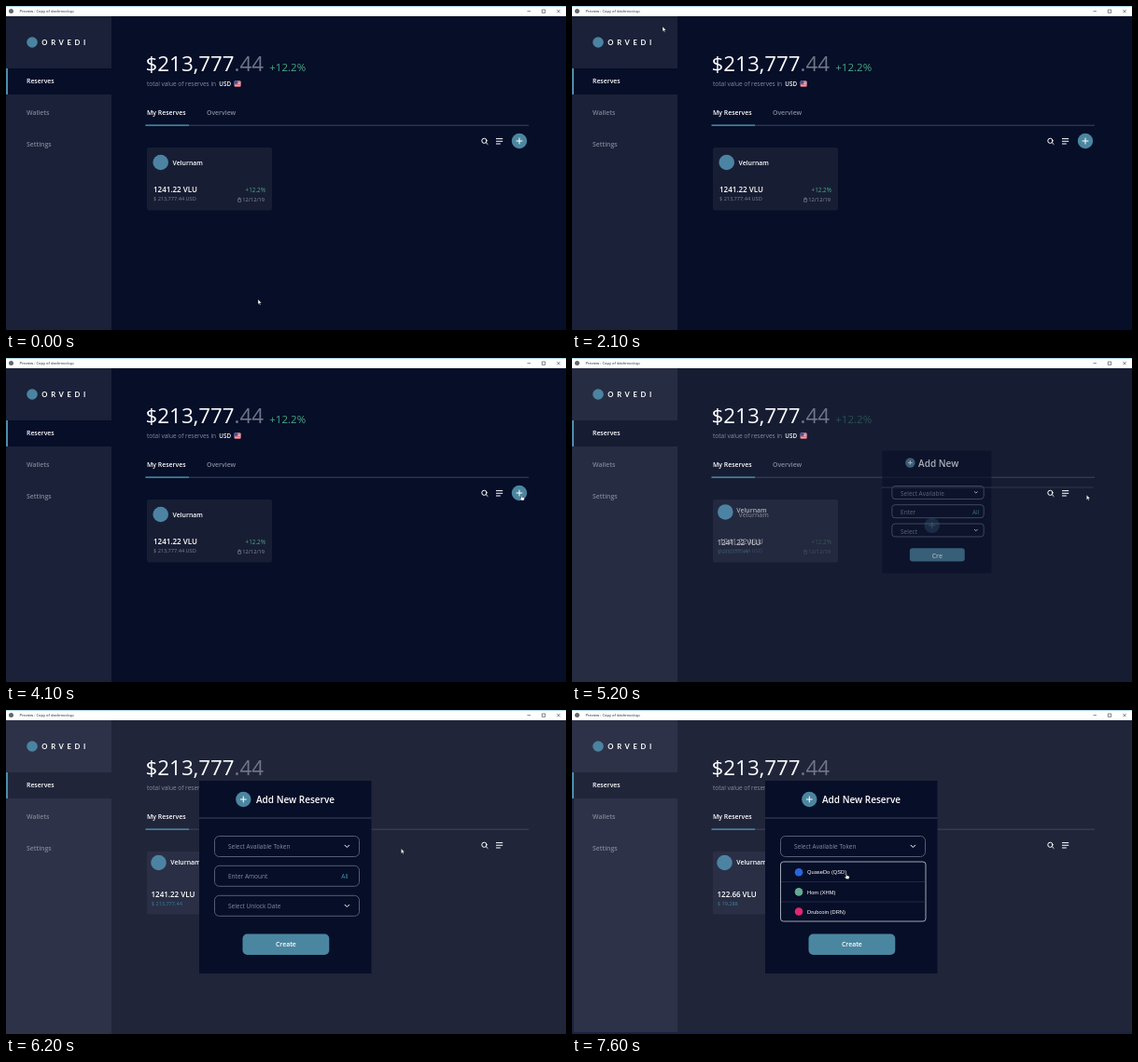
An HTML page that plays this animation: 600 by 348 pixels, repeating every 8 s.

```html
<!DOCTYPE html>
<html lang="en">
<head>
<meta charset="utf-8">
<title>Reserves dashboard</title>
<style>
html, body { margin: 0; width: 100%; height: 100%; overflow: hidden; background: #060e28; }
svg { display: block; width: 600px; height: 348px; font-family: "Open Sans", "Noto Sans", sans-serif; }
.semi { font-weight: 600; }
.menu { font-size: 6.9px; font-weight: 600; }
.label { font-size: 6.5px; fill: #868da0; }
.outline { fill: none; stroke: #555d76; }
.icon { fill: none; stroke: #fff; stroke-linecap: round; stroke-linejoin: round; }
#panel * { vector-effect: non-scaling-stroke; }
</style>
</head>
<body>
<svg viewBox="0 0 600 348" fill="#fff">
  <rect id="main" width="600" height="348"/>
  <rect id="side" y="11" width="113" height="337"/>
  <rect id="active" y="67" width="113" height="28"/>
  <g id="edge" fill="#1a2440">
    <rect y="95" width="2" height="253"/>
    <rect y="346" width="600" height="2"/>
  </g>
  <rect y="67" width="2" height="28" fill="#4b8fa9"/>

  <rect width="600" height="11"/>
  <rect width="600" height=".7" fill="#8fd0e4"/>
  <circle cx="5.5" cy="5.6" r="2.5" fill="#666"/>
  <text x="14.5" y="7.4" font-size="4.1" fill="#222">Preview : Copy of dashmockup</text>
  <path d="M558.5 5.7h3.5M574.3 4h3.4v3.4h-3.4zM590.3 4l3.4 3.4m0-3.4l-3.4 3.4" fill="none" stroke="#333" stroke-width=".6"/>

  <circle cx="28" cy="39" r="5.8" fill="#4b83a0"/>
  <text x="38.3" y="41.8" font-size="7.6" font-weight="700" letter-spacing="3.7" style="font-family:Lato,sans-serif">ORVEDI</text>
  <g class="menu">
    <text x="22" y="82.5">Reserves</text>
    <text x="22" y="116.8" fill="#7f8596">Wallets</text>
    <text x="22" y="150.8" fill="#7f8596">Settings</text>
    <text x="151" y="117">My Reserves</text>
    <text x="215" y="117" fill="#858b9c">Overview</text>
  </g>

  <text x="149.5" y="69.8" font-size="22.4">$213,777<tspan fill="#717789">.44</tspan></text>
  <text x="151" y="86" class="label">total value of reserves in</text>
  <text x="228.3" y="86" font-size="6.3" class="semi">USD</text>
  <g>
    <rect x="244.7" y="80.5" width="6.8" height="6" rx="1" fill="#eee"/>
    <path d="M244.7 81.2h6.8m-6.8 1.7h6.8m-6.8 1.7h6.8m-6.8 1.5h6.8" stroke="#d94257" stroke-width=".85"/>
    <rect x="244.7" y="80.5" width="3.6" height="3.3" rx=".6" fill="#3d4f9c"/>
  </g>
  <path d="M149.5 128.2H560" stroke="#3e455a"/>
  <path d="M149.5 128.2H196" stroke="#4a97b2" stroke-width="1.3"/>
  <g class="icon">
    <circle cx="512.4" cy="144.8" r="2.6"/>
    <path d="M514.4 146.8l1.7 1.7M525.4 142.6h6.4M525.4 145.3h6.4M525.4 148h4"/>
  </g>

  <rect id="card" x="151" y="152" width="134" height="67.5" rx="2"/>
  <circle id="coin" r="8.3" fill="#4c83a3"/>
  <g id="before">
    <text x="282.3" y="69.5" font-size="11.5" fill="#49a983">+12.2%</text>
    <text x="178.5" y="170.5" class="menu">Velurnam</text>
    <text x="158" y="200" font-size="8" class="semi">1241.22 VLU</text>
    <text x="158" y="209.2" font-size="5.6" fill="#7f8596">$ 213,777.44 USD</text>
    <text x="256.5" y="200" font-size="6.35" fill="#49a983">+12.2%</text>
    <path d="M248.6 207.4h3v2.9h-3zM249.2 207.4v-1.3h1.8v1.3" fill="none" stroke="#8a90a0" stroke-width=".6"/>
    <text x="253.2" y="210" font-size="5.75" fill="#8a90a0">12/12/19</text>
  </g>
  <text id="after" x="176.3" y="165.9" class="menu">Velurnam</text>
  <g id="holdingA">
    <text x="155.5" y="201" font-size="8" class="semi">1241.22 VLU</text>
    <text x="155.8" y="210.3" font-size="5.6" fill="#3f7f98">$ 213,777.44</text>
  </g>
  <g id="holdingB">
    <text x="155.5" y="201" font-size="8" class="semi">122.66 VLU</text>
    <text x="155.8" y="210.3" font-size="5.6" fill="#3f7f98">$ 19,288</text>
  </g>

  <g id="modal">
    <g id="panel">
      <rect x="207" y="76" width="184.5" height="207" fill="#070e28"/>
      <circle cx="254.3" cy="96" r="8.2" fill="#4b86a0"/>
      <path class="icon" d="M251.3 96h6m-3-3v6"/>
      <rect class="outline" x="223.5" y="135.5" width="155" height="22" rx="5"/>
      <path class="icon" d="M363 145.2l2.3 2.3 2.3-2.3" stroke="#8a91a5"/>
      <g class="closed">
        <rect class="outline" x="223.5" y="167.3" width="155" height="22" rx="5"/>
        <rect class="outline" x="223.5" y="199.3" width="155" height="22" rx="5"/>
        <path class="icon" d="M363 209.2l2.3 2.3 2.3-2.3" stroke="#8a91a5"/>
      </g>
      <rect x="253.5" y="240.5" width="92.8" height="22.5" rx="5" fill="#4b86a0"/>
    </g>
    <path id="rule" stroke="#3d455e"/>
    <g id="labels"></g>
    <g id="list">
      <rect x="223.5" y="163" width="155.5" height="64" rx="3" fill="#070e28" stroke="#a0a7b6"/>
      <path d="M224 184.5h154.5M224 206h154.5" stroke="#293149" stroke-width=".8"/>
    </g>
  </g>
  <g id="add">
    <circle r="8.2" fill="#4b86a0"/>
    <path class="icon" d="M-3 0h6m-3-3v6"/>
  </g>

  <g stroke="#10131c" stroke-width=".4">
    <path id="arrow" d="M0 0V5.4L1.2 4.3 2.1 6.2 2.9 5.8 2.1 4H3.8Z"/>
    <path id="hand" d="M.4.4Q1-.4 1.4.5V2.3L3.8 2.9Q4.5 3.2 4.2 4L3.6 6H.9L-.9 3.9Q-.7 3 .4 3.9Z"/>
  </g>
</svg>
<script>
const LOOP = 8000, STEP = 100;
const $ = id => document.getElementById(id);
const lerp = (a, b, p) => a + (b - a) * p;
const easeOut = (t, start, length) => {
  const u = Math.min(1, Math.max(0, (t - start) / length));
  return 1 - (1 - u) ** 3;
};
const mix = (a, b, p) => `rgb(${a.map((v, i) => Math.round(lerp(v, b[i], p)))})`;
const set = (id, attrs) => {
  for (const key in attrs) $(id).setAttribute(key, attrs[key]);
};
const add = (parent, tag, attrs, text = "") => {
  const el = document.createElementNS("http://www.w3.org/2000/svg", tag);
  for (const key in attrs) el.setAttribute(key, attrs[key]);
  el.textContent = text;
  return $(parent).appendChild(el);
};

// Surface colours: plain, then dimmed behind the dialog
const surfaces = {
  main: [[6, 14, 40], [32, 37, 58]],
  active: [[6, 14, 40], [32, 37, 58]],
  side: [[26, 33, 56], [45, 50, 72]],
  card: [[23, 30, 52], [42, 47, 69]]
};

const firstWords = (text, room) => {
  while (text.length > room && text.includes(" ")) text = text.slice(0, text.lastIndexOf(" "));
  return text;
};
const labels = [
  { text: "Add New Reserve", x: 268, y: 96, dy: 3.5, size: 10, weight: 600, fill: "#fff" },
  { text: "Select Available Token", x: 238, y: 146.5, slack: 3 },
  { text: "Enter Amount", x: 238, y: 178.3, closed: true },
  { text: "All", x: 359.3, y: 178.3, fill: "#4b93ae", closed: true },
  { text: "Select Unlock Date", x: 238, y: 210.3, closed: true },
  { text: "Create", x: 299.9, y: 251.5, size: 6.9, weight: 600, fill: "#fff", anchor: "middle", byLetter: true }
];
for (const l of labels) {
  l.el = add("labels", "text", {
    "font-size": l.size || 6.5, "font-weight": l.weight || 400,
    fill: l.fill || "#868da0", "text-anchor": l.anchor || "start"
  });
}

[["QuaseDo (QSD)", "#2866dc"], ["Hom (XHM)", "#64aa92"], ["Drubcoin (DRN)", "#e0286f"]].forEach(([name, fill], i) => {
  const y = 174.3 + 21.1 * i;
  add("list", "circle", { cx: 243, cy: y, r: 4.3, fill });
  add("list", "text", { x: 252, y: y + 2.1, "font-size": 5.75, "font-family": "Liberation Sans, sans-serif" }, name);
});

// Pointer route: time, x, y; one leg per visit to the window
const legs = [
  [[0, 270, 315], [200, 120, 230], [400, 3, 90], [500, 60, 12], [650, 300, 14], [900, 550, 145],
   [1000, 550, 145], [1200, 340, 220], [1300, 247.5, 190.5], [1500, 32, 8]],
  [[2000, 33, 35], [2100, 97, 22]],
  [[2400, 360, 21], [2900, 511.3, 142.5], [3200, 546, 146], [3300, 548, 145.5], [3700, 548, 145.5],
   [4100, 551.3, 147], [5900, 551.3, 147], [6400, 338, 150], [6600, 332.3, 151.3], [6800, 330, 156],
   [7000, 296, 185], [7200, 282, 214], [7600, 293, 175.5], [8000, 293, 175.5]]
];
const handTimes = [[2800, 3000], [3200, 5000], [6900, 8000]];

function pointerAt(t) {
  const leg = legs.find(l => t >= l[0][0] && t <= l[l.length - 1][0]);
  if (!leg) return null;
  const i = Math.max(1, leg.findIndex(k => k[0] >= t));
  const [a, b] = [leg[i - 1], leg[i]], p = (t - a[0]) / (b[0] - a[0]);
  return [lerp(a[1], b[1], p), lerp(a[2], b[2], p)];
}

function drawPointer(t) {
  const at = pointerAt(t), hand = handTimes.some(([a, b]) => t >= a && t <= b);
  const show = (id, on) => set(id, {
    visibility: at && on ? "visible" : "hidden",
    transform: at ? `translate(${at})` : ""
  });
  show("arrow", !hand);
  show("hand", hand);
}

function draw(t) {
  const p = easeOut(t, 5086, 400);
  const q = easeOut(t, 6340, 400);
  for (const id in surfaces) set(id, { fill: mix(...surfaces[id], p) });
  set("edge", { opacity: q });
  set("coin", { cx: lerp(165.7, 163.5, p), cy: lerp(168, 164, p) });
  set("before", { opacity: 1 - p });
  set("after", { opacity: p });
  set("holdingA", { opacity: p * (1 - q) });
  set("holdingB", { opacity: q });

  // The dialog grows out of the add button
  const x = v => lerp(550, v, p), y = v => lerp(141, v, p);
  set("modal", { opacity: p });
  set("panel", { transform: `translate(${x(0)} ${y(0)}) scale(${p})` });
  set("rule", { d: `M${lerp(548, 207, p)} ${lerp(179, 116, p)}H${lerp(849, 391.5, p)}` });
  for (const l of labels) {
    l.el.setAttribute("x", x(l.x));
    l.el.setAttribute("y", y(l.y) + (l.dy || 2.3) + 4 * (1 - p));
    l.el.textContent = l.byLetter
      ? l.text.slice(0, Math.floor(l.text.length * p))
      : firstWords(l.text, l.text.length * p + (l.slack || 1));
    if (l.closed) l.el.setAttribute("opacity", 1 - q);
  }
  document.querySelector(".closed").setAttribute("opacity", 1 - q);
  set("list", { opacity: q });
  set("add", {
    transform: `translate(${lerp(550, 291, p)} ${lerp(145, 200, p)})`,
    opacity: (1 - p) ** 1.5
  });
  drawPointer(t);
}

const begin = performance.now();
function tick() {
  const t = (performance.now() - begin) % LOOP;
  draw(Math.floor(t / STEP) * STEP);
  requestAnimationFrame(tick);
}
tick();
</script>
</body>
</html>
```
